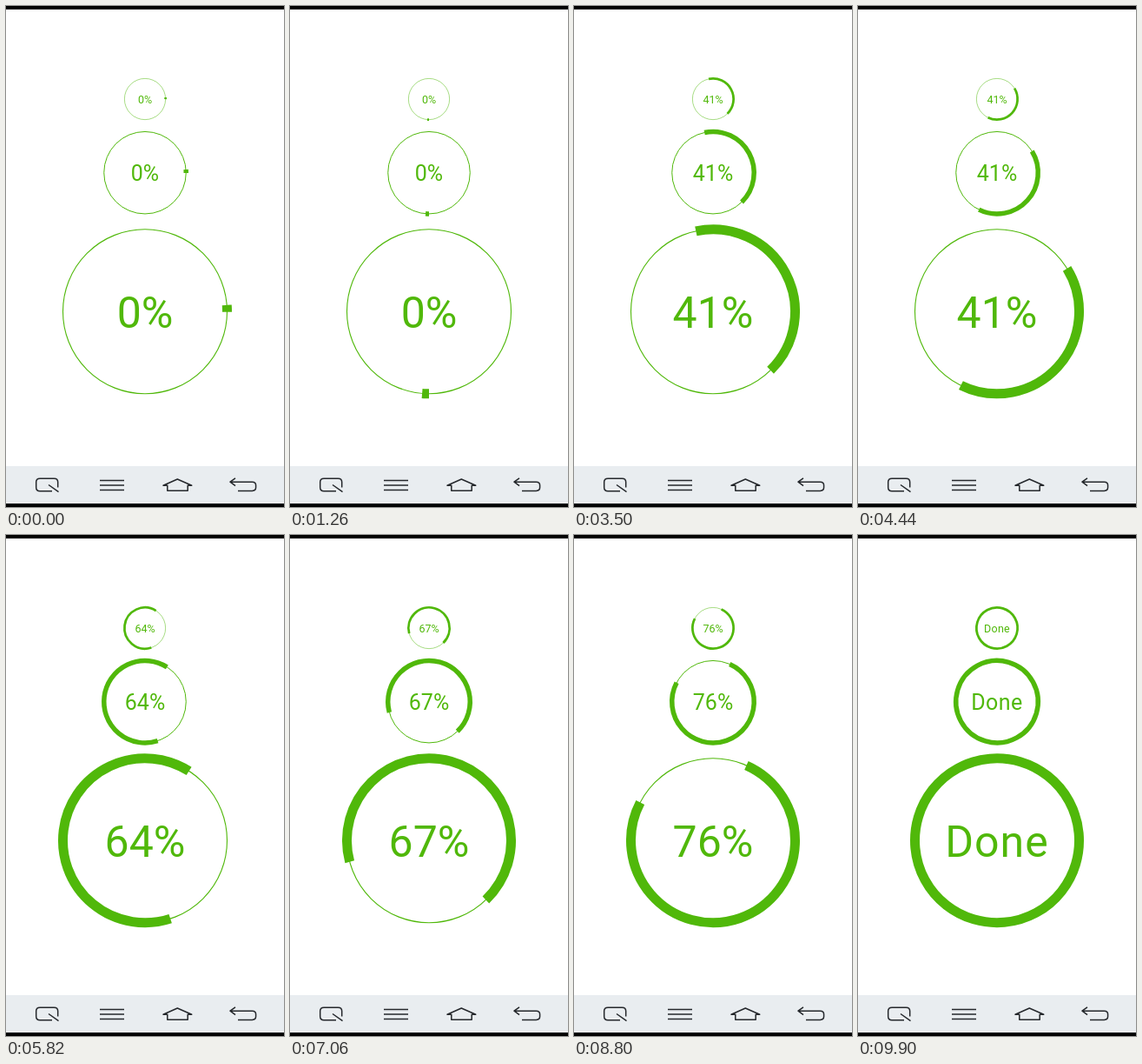
An HTML page that plays this animation: 320 by 576 pixels, repeating every 10 s.

```html
<!DOCTYPE html>
<html lang="en">
<head>
<meta charset="utf-8">
<title>Progress wheels</title>
<style>
  html, body { margin: 0; width: 100%; height: 100%; overflow: hidden; background: #fff; }
  svg { display: block; width: 100vw; height: 100vh; }
  text { font-family: Roboto, sans-serif; text-anchor: middle; fill: #50b80a; }
  .ring { fill: none; stroke: #50b80a; }
  .icon { fill: none; stroke: #25282c; stroke-width: 1.5; stroke-linejoin: round; }
</style>
</head>
<body>
<svg viewBox="0 0 320 576">
  <rect width="320" height="576" fill="#fff"/>
  <rect width="320" height="4" fill="#000"/>
  <g id="wheels"></g>
  <rect y="529" width="320" height="43" fill="#e9edf0"/>
  <rect y="572" width="320" height="4" fill="#000"/>
  <g class="icon">
    <path d="M53 557.7H39Q34.7 557.7 34.7 553.5V547.3Q34.7 543.2 39 543.2H55.5Q59.7 543.2 59.7 547.3V553.5M49 550.5L60.5 558.7"/>
    <path d="M108 545.5H136M108 551H136M108 556.5H136"/>
    <path d="M181 551.3L197.3 544L213.8 551.3H209.2V557.3H185.8V551.3Z"/>
    <path d="M264 542.8L258 547.2L264 551.6M258 547.2H283.5Q287.6 547.2 287.6 551V553.6Q287.6 557.4 283.5 557.4H267"/>
  </g>
</svg>
<script>
const NS = 'http://www.w3.org/2000/svg';
const LOOP = 10000, STEP = 20, HOLD = 1650, LAST = 495;
const LEVELS = [0, 20, 41, 64, 67, 76];
const CX = 160;

function add(tag, attrs) {
  const el = document.createElementNS(NS, tag);
  for (const key in attrs) el.setAttribute(key, attrs[key]);
  return document.getElementById('wheels').appendChild(el);
}

function makeWheel(cy, size, thin) {
  const r = size * 0.4725, width = size * 0.055;
  add('circle', { class: 'ring', cx: CX, cy, r, 'stroke-width': thin });
  return {
    cy, r,
    arc: add('path', { class: 'ring', 'stroke-width': width }),
    label: add('text', { x: CX, y: cy + size * 0.0935, 'font-size': size / 4 })
  };
}

const wheels = [makeWheel(107, 50, 0.5), makeWheel(191.7, 100, 1), makeWheel(351.25, 200, 1.1)];

function arcPath(w, from, sweep) {
  const at = deg => {
    const a = deg * Math.PI / 180;
    return `${CX + w.r * Math.cos(a)} ${w.cy + w.r * Math.sin(a)}`;
  };
  const half = from + sweep / 2, big = sweep > 359 ? 0 : +(sweep / 2 > 180);
  const seg = end => `A${w.r} ${w.r} 0 ${big} 1 ${at(end)}`;
  return `M${at(from)}${seg(half)}${seg(from + sweep)}`;
}

function draw(time) {
  const n = Math.min(Math.floor(time / STEP), LAST);
  const done = n === LAST;
  const pct = done ? 100 : LEVELS[Math.floor(n * STEP / HOLD)];
  const turn = n > 412 ? n - 1 : n; // the spin pauses for one step
  const from = 1.5 * turn - 4.5;
  const sweep = Math.max(4.8, pct * 3.6);
  for (const w of wheels) {
    w.arc.setAttribute('d', arcPath(w, from, sweep));
    w.label.textContent = done ? 'Done' : pct + '%';
    w.label.style.letterSpacing = done ? '0.02em' : '0';
  }
}

const begin = performance.now();
function tick() {
  draw((performance.now() - begin) % LOOP);
  requestAnimationFrame(tick);
}
tick();
</script>
</body>
</html>
```
